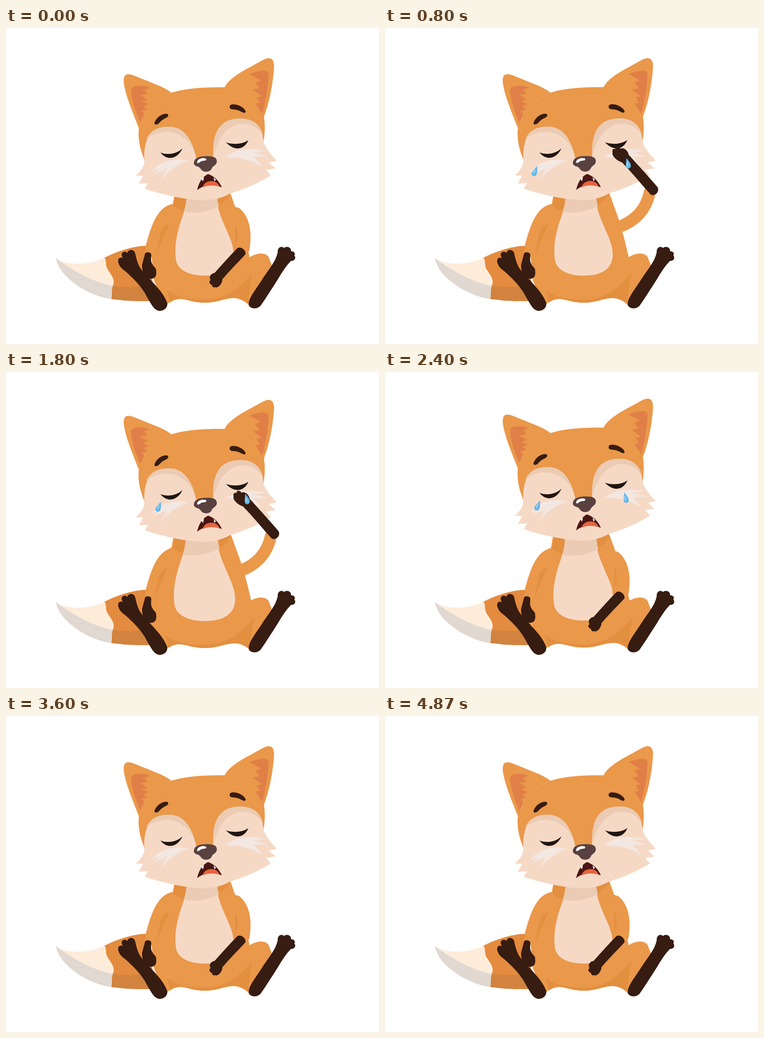
An HTML page for the animation above (5 s loop, 814 by 688 pixels).

```html
<!DOCTYPE html>
<html lang="en">
<head>
<meta charset="utf-8">
<title>Sad fox</title>
<style>
  html, body { margin: 0; width: 100%; height: 100%; overflow: hidden; background: #fff; }
  svg { display: block; width: 814px; height: 688px; }
  .fur { fill: #ea984a; }
  .fold { fill: #e38f40; }
  .cream { fill: #f6d9c5; }
  .lid { fill: #ebcbb3; }
  .ear { fill: #e17f48; }
  .dark { fill: #371c11; }
  .whisker { fill: #f3e7e1; }
</style>
</head>
<body>
<svg viewBox="0 0 814 688">
  <g id="tail">
    <path fill="#e38b3f" d="M215 500C245 485 280 474 310 474L325 594C270 596 250 592 229 590L213 540Z"/>
    <path fill="#d1833f" d="M230 561Q270 567 308 561L325 594C270 596 250 592 229 590Z"/>
    <path fill="#fdecd9" d="M109 501C130 517 180 518 215 500C220 506 216 516 222 526C230 538 236 545 235 556C229 567 232 578 230 590C180 584 115 540 109 501Z"/>
    <path fill="#e0d8d1" d="M109 501L122 511C148 527 185 552 233 562C229 572 232 580 230 590C180 584 115 542 109 501Z"/>
  </g>

  <path class="fur" d="M526 505C538 490 570 484 575 503L582 522L545 592L515 580Z"/>
  <g id="torso">
    <path class="fur" d="M370 350L364 384Q335 400 316 480L323 550L348 606Q358 592 375 590C395 589 405 598 435 598C460 598 475 589 495 588Q512 587 530 603L545 560L532 500Q524 465 514 428L489 358Z"/>
    <path class="fold" d="M351 570L358 598Q366 591 378 590C395 589 405 598 435 598C460 598 475 589 495 588Q512 587 528 600Q531 565 538 533Q518 558 497 572C475 587 455 591 430 591C395 591 372 586 351 570Z"/>
  </g>
  <path id="neckShade" class="fold" d="M371 352L365 388C400 408 440 406 465 387Q478 378 490 362L488 352Z"/>
  <g id="belly">
    <path class="cream" d="M394 352L394 372C392 396 385 408 378 432C370 462 368 480 371 505C375 530 405 539 433 539C465 539 495 530 497 495C497 470 485 450 475 425C467 407 462 392 460 372L460 352Z"/>
    <path class="lid" d="M394 352L394 372Q392 388 388 400Q430 407 465 387Q461 380 460 352Z"/>
  </g>

  <path class="fur" d="M365 383C330 388 317 430 305 474L303 496L320 500L329 495Q337 466 352 432L372 402Z"/>
  <path id="crease" class="fold" d="M355 427Q340 432 336 450L327 497Q334 476 340 462Q350 446 355 427Z"/>
  <path class="dark" d="M245 510C243 501 250 498 255 501C247 489 260 483 265 490C266 481 280 481 282 491C285 505 289 519 297 528C318 553 343 573 352 599C353 612 342 616 335 616C322 614 318 602 309 588C298 565 280 547 261 530C251 523 247 518 245 510Z"/>
  <path class="dark" d="M303 493C303 486 318 487 317 495C316 508 316 512 327 524C330 540 326 547 313 546C303 545 296 530 297 515Z"/>
  <path class="dark" d="M593 488C592 478 601 473 607 479C612 474 623 477 622 486C632 486 631 494 629 495C634 500 630 508 622 507C612 517 603 531 594 546C580 568 566 590 556 604C550 612 535 613 530 604C527 590 545 570 560 546C575 523 589 508 593 488Z"/>

  <path id="upperArm" fill="none" stroke="#ea984a" stroke-linecap="round"/>
  <path id="armCrease" class="fold" d="M500 426Q508 440 505 458L497 481Q503 456 500 426Z"/>

  <g id="head">
    <path class="fur" d="M290 218C275 180 260 145 257 118C256 100 264 98 278 103L330 124Q350 132 361 141Q400 128 477 129Q485 112 520 92L562 69Q585 58 585 85Q581 145 563 193Q567 220 562 248L570 300L480 350L310 330L302 287Q286 248 290 218Z"/>
    <path fill="none" stroke="#edaa69" d="M293 206Q315 160 361 141"/>
    <path class="ear" d="M273 134Q274 126 292 126Q306 126 313 130L301 135L309 143L293 146L309 156L297 160L312 166L300 171L308 177L296 181L302 188L293 206C284 185 274 160 273 134Z"/>
    <path class="ear" d="M531 100Q548 94 562 93Q574 93 573 106Q570 150 559 187L545 165L554 163L547 151L558 149L539 134L553 131L544 119L556 114Z"/>
    <path class="cream" d="M302 287C299 238 320 215 355 215C390 215 407 245 415 283L452 282C450 222 470 197 512 197C542 197 560 215 562 248Q567 265 591 289L574 293L588 306L568 309L578 321Q540 345 490 360Q460 376 432 375C390 374 340 363 303 350L310 338L290 339L299 322L283 321Q302 306 302 287Z"/>
    <path class="lid" d="M306 243C315 222 332 215 355 215C390 215 407 245 415 283C401 222 338 213 306 243Z"/>
    <path class="lid" d="M452 278C450 222 470 197 512 197C540 197 557 212 561 236C550 210 512 197 484 221C466 237 460 255 452 278Z"/>
    <path class="whisker" d="M398 289C365 282 333 290 316 315L334 307L321 320L350 307L337 334C350 314 372 298 398 289Z"/>
    <path class="whisker" d="M481 281C500 263 530 260 568 268L539 271L573 280L541 280L559 302C538 289 510 281 481 281Z"/>
    <path class="dark" d="M324 207C327 196 340 185 352 187C358 191 350 196 345 198C338 201 334 209 329 210Q324 211 324 207Z"/>
    <path class="dark" d="M488 171C489 165 497 166 503 167C512 169 522 176 523 182C522 187 516 184 511 181C504 177 498 178 493 177C489 176 488 174 488 171Z"/>
    <path fill="#201512" d="M337 271C352 277 372 275 385 262C376 284 352 291 337 271Z"/>
    <path fill="#201512" d="M480 249C495 254 515 254 529 244C521 264 500 270 480 249Z"/>
    <path fill="#594140" d="M410 295C410 281 425 279 440 279C455 279 461 283 460 292C458 300 451 300 449 306C445 315 430 315 425 307C422 300 412 303 410 295Z"/>
    <path fill="#fff" d="M417 292C418 284 430 282 436 284C440 290 432 288 426 290C421 294 418 296 417 292Z"/>
    <path fill="#4a1613" d="M417 353Q421 335 430 326Q436 320 441 318Q450 321 458 328Q467 337 471 347Q455 341 444 342Q428 344 417 353Z"/>
    <path fill="#e5653f" d="M429 347C433 330 460 328 466 345C452 342 440 342 429 347Z"/>
    <path fill="#fff" d="M426 328L432 325L430 334ZM453 325L458 330L455 334Z"/>
  </g>

  <path id="forearm" class="dark" d="M-4 -11C20 -11 50 -9 78 -10C86 -16 102 -17 104 -10C109 -8 108 -2 105 -1C109 4 105 9 99 8C97 16 86 17 80 12C60 12 20 12 -2 11C-12 8 -12 -7 -4 -11Z"/>

  <defs>
    <g id="drop">
      <path fill="#64b5e8" d="M0 -12C3 -4 6 2 5 7C3 13 -5 13 -6 7C-6 2 -2 -5 0 -12Z"/>
      <path fill="#9bd3f3" d="M-1 -5C1 0 1 5 -2 7C-5 6 -3 0 -1 -5Z"/>
    </g>
  </defs>
  <use id="tearL" href="#drop"/>
  <use id="tearR" href="#drop"/>
</svg>
<script>
  const LOOP = 5000, STEP = 1000 / 15, LAST_STEP = 73;
  const HEAD_RISE = 10, CHEST_LEAD = 40;
  // Moments of full exhale; each gap within a row is one sob.
  const SOBS = [
    [40, 407, 815, 1250, 1690, 2120, 2550],
    [3650, 4060, 4465, 4870]
  ];
  const ARM = {
    lap:  { sx: 500, sy: 408, cx: 521, cy: 428, ex: 514, ey: 478, width: 36, fx: 512, fy: 488, angle: 132, reach: .9 },
    face: { sx: 508, sy: 434, cx: 566, cy: 414, ex: 578, ey: 357, width: 26, fx: 585, fy: 352, angle: -132.5, reach: 1.15 }
  };
  const TEARS = { start: 500, period: 600, count: 5 };

  const el = id => document.getElementById(id);
  const set = (id, name, value) => el(id).setAttribute(name, value);
  const clamp = x => Math.min(1, Math.max(0, x));
  const smooth = x => (x = clamp(x), x * x * (3 - 2 * x));
  const ramp = (t, from, to) => smooth((t - from) / (to - from));

  function sobLift(t) {
    for (const row of SOBS)
      for (let i = 1; i < row.length; i++)
        if (t >= row[i - 1] && t < row[i])
          return (1 - Math.cos(2 * Math.PI * (t - row[i - 1]) / (row[i] - row[i - 1]))) / 2;
    return 0;
  }

  function scaleAbout(id, x, y, kx, ky) {
    set(id, 'transform', `translate(${x} ${y}) scale(${kx} ${ky}) translate(${-x} ${-y})`);
  }

  function drawArm(u) {
    const a = {};
    for (const key in ARM.lap) a[key] = ARM.lap[key] + (ARM.face[key] - ARM.lap[key]) * u;
    set('upperArm', 'd', `M${a.sx} ${a.sy}Q${a.cx} ${a.cy} ${a.ex} ${a.ey}`);
    set('upperArm', 'stroke-width', a.width);
    set('forearm', 'transform', `translate(${a.fx} ${a.fy}) rotate(${a.angle}) scale(${a.reach} 1)`);
    set('armCrease', 'opacity', u > 0 ? 0 : 1);
  }

  function drawTear(id, t, rise, x, y, dx, dy, tilt) {
    const n = (t - TEARS.start) / TEARS.period;
    const p = n - Math.floor(n);
    const visible = n >= 0 && n < TEARS.count;
    const size = .4 + .6 * clamp(p / .16);
    set(id, 'opacity', visible ? clamp((1 - p) / .25) : 0);
    set(id, 'transform', `translate(${x + dx * p} ${y + dy * p - rise}) rotate(${tilt}) scale(${size})`);
  }

  function draw(t) {
    const rise = HEAD_RISE * sobLift(t), chest = sobLift(t + CHEST_LEAD);
    set('head', 'transform', `translate(0 ${-rise})`);
    scaleAbout('torso', 433, 480, 1 + .05 * chest, 1 + .032 * chest);
    scaleAbout('belly', 433, 465, 1 + .065 * chest, 1 + .055 * chest);
    set('neckShade', 'transform', `translate(0 ${-3 * chest})`);
    set('crease', 'transform', `translate(${-4 * chest} ${-2 * chest})`);
    drawArm(ramp(t, 100, 500) - ramp(t, 1830, 2200));
    drawTear('tearL', t, rise, 337, 292, -18, 39, 20);
    drawTear('tearR', t, rise, 523, 275, 14, 39, -16);
  }

  const begin = performance.now();
  function tick() {
    const t = (performance.now() - begin) % LOOP;
    draw(Math.min(LAST_STEP, Math.floor((t + 3.4) / STEP)) * STEP);
    requestAnimationFrame(tick);
  }
  tick();
</script>
</body>
</html>
```
